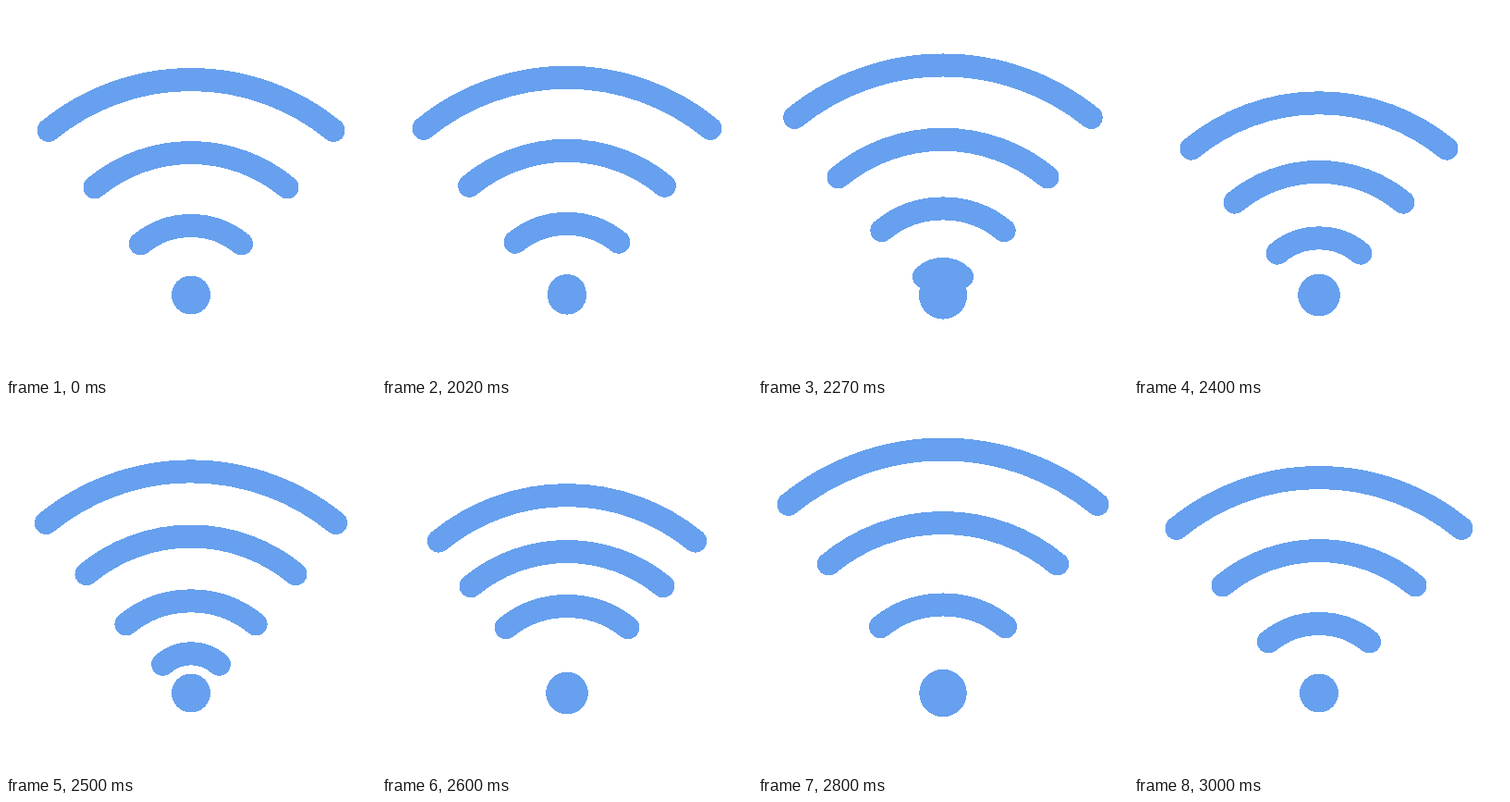
Write an HTML page that moves like this. It is 400 by 400 pixels and loops after 3.02 s.

```html
<!DOCTYPE html>
<html>
<head>
<meta charset="utf-8">
<style>
  html, body { margin: 0; width: 100%; height: 100%; overflow: hidden; background: #fff; }
  svg { display: block; width: 100%; height: 100%; shape-rendering: crispEdges; }
  path { fill: none; stroke: #66a0ee; stroke-width: 25; stroke-linecap: round; }
  circle { fill: #66a0ee; }
</style>
</head>
<body>
<svg viewBox="0 0 400 400">
  <path/><path/><path/><path/>
  <circle cx="200" cy="312.5" r="21"/>
</svg>
<script>
const LOOP = 3020, REST = 2000, FRAME = 25;
const STEP1 = 225, STEP2 = 475, END = 1000;

// Arc poses: half width, y of the ends, y of the top
const slots = [
  [6, 308, 304.5],
  [54.5, 257, 237.5],
  [104, 196, 158.5],
  [154, 134.5, 79.5],
  [187, 60, -3]
];
// Last step: overshoot pose, its time and the ease-out power
const swings = [
  { pose: [72, 235, 209.8], peak: 700, power: 2.78 },
  { pose: [125.8, 170.3, 125], peak: 750, power: 1.83 },
  { pose: [167, 108.5, 49], peak: 800, power: 1.58 }
];
const lead = [0.1, 0.035, -0.02, -0.012, 0];
const lastLead = [0.17, 0.1, 0.035, -0.02];
const VANISH = 0.4; // the outermost arc disappears past this progress

const paths = document.querySelectorAll('path');
const dot = document.querySelector('circle');

const mix = (a, b, f) => a.map((v, i) => v + (b[i] - v) * f);
const smooth = u => u * u * (3 - 2 * u);
const between = (i, f) => i === 3 && f > VANISH ? null : mix(slots[i], slots[i + 1], f);

function arcPose(i, t) {
  if (t < STEP1) {
    const u = t / STEP1;
    return between(i, u * u * (2.4 - 1.4 * u) * (1 + lead[i + 1]));
  }
  if (t < STEP2) return between(i, lead[i] + (t - STEP1) / 250);
  if (i === 3) return between(i, lastLead[i] + (t - STEP2) / 250);

  const { pose, peak, power } = swings[i];
  if (t < peak) {
    const u = (t - STEP2) / (peak - STEP2);
    return mix(between(i, lastLead[i]), pose, 1 - (1 - u) ** power);
  }
  return mix(pose, slots[i + 1], smooth((t - peak) / (END - peak)));
}

function arcPath([w, y, top]) {
  const sag = y - top;
  const r = (w * w + sag * sag) / (2 * sag);
  return `M${200 - w} ${y}A${r} ${r} 0 0 1 ${200 + w} ${y}`;
}

function draw(now) {
  const tick = FRAME * Math.floor((now % LOOP + 5) / FRAME);
  const t = Math.min(END, Math.max(0, tick - REST));
  paths.forEach((path, i) => {
    const pose = t === 0 || t === END ? (i < 3 ? slots[i + 1] : null) : arcPose(i, t);
    path.setAttribute('d', pose ? arcPath(pose) : '');
  });
  const pulse = 1 - Math.abs(t % 500 - 250) / 250;
  dot.setAttribute('r', 21 + 5.3 * smooth(pulse));
}

const start = performance.now();
function loop() {
  draw(performance.now() - start);
  requestAnimationFrame(loop);
}
loop();
</script>
</body>
</html>
```
